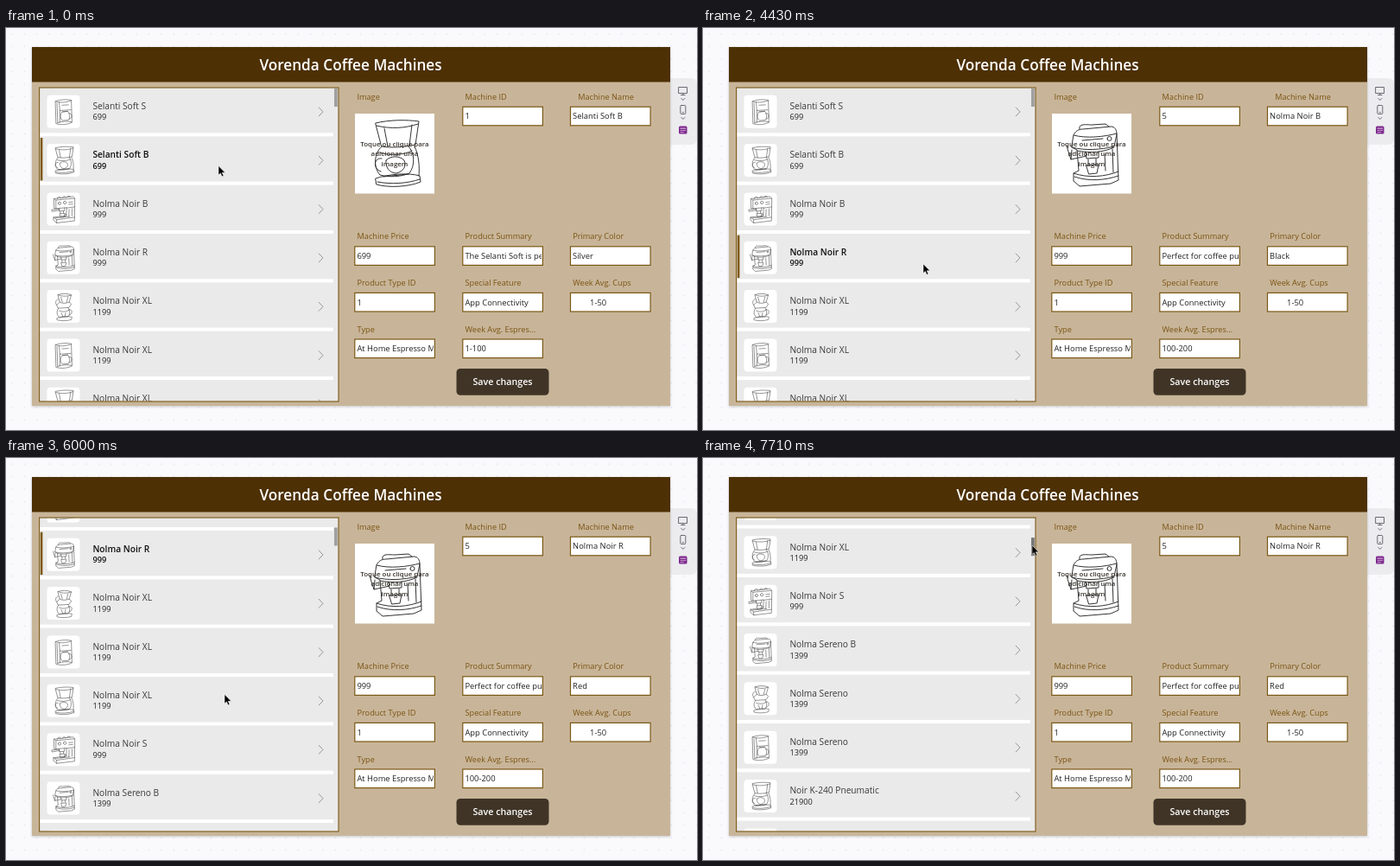
Animation of 800 by 465 pixels, one loop 8 s. Source, as an HTML page:

```html
<!DOCTYPE html>
<html lang="en">
<head>
<meta charset="utf-8">
<title>Coffee machine catalogue</title>
<style>
  html, body { margin: 0; width: 100%; height: 100%; overflow: hidden; background: #fafafd; }
  svg { display: block; }
  text { font-family: "Open Sans", "Noto Sans", sans-serif; white-space: pre; }
  .name { font-size: 10.2px; fill: #3a3a3a; }
  .price { font-size: 9.2px; fill: #222; }
  .sel text { font-weight: 600; fill: #111; }
  .bar { visibility: hidden; }
  .sel .bar { visibility: visible; }
  .label { font-size: 9.2px; fill: #7a5312; }
  .field { font-size: 9.4px; fill: #222; }
  .hint { font-size: 7.9px; font-weight: 600; fill: #3b3630; text-anchor: middle; }
  .line { fill: none; stroke-linecap: round; stroke-linejoin: round; }
</style>
</head>
<body>
<svg id="stage" width="800" height="465" viewBox="0 0 800 465">
  <defs>
    <pattern id="dots" width="14.4" height="14.4" patternUnits="userSpaceOnUse">
      <circle cx="7" cy="7" r=".8" fill="#e2e2e9"/>
    </pattern>
    <filter id="shadow" x="-5%" y="-5%" width="110%" height="112%">
      <feDropShadow dx="0" dy="1" stdDeviation="1.6" flood-color="#000" flood-opacity=".22"/>
    </filter>
    <clipPath id="listClip"><rect x="39" y="69.5" width="345.5" height="362"/></clipPath>

    <!-- Machine sketches, each on a 92 x 92 square -->
    <path id="m0" d="M24 17C36 12 54 11 68 14L70 76C58 83 38 84 26 80ZM24 17C34 22 54 21 68 15M34 20L36 43L67 41M36 43L36 76M28 22L30 78M42 47C36 54 37 67 43 71L60 70C65 63 64 52 59 46ZM61 51C71 48 73 65 62 67M44 47L58 45M30 77C42 73 58 72 69 75M42 28L60 27"/>
    <path id="m1" d="M24 11C40 7 60 7 74 9L70 36C56 39 42 40 31 38ZM25 14C42 18 58 17 73 12M66 13L63 37M34 17L38 38M31 38C22 46 21 62 29 71C40 74 54 73 63 69C70 60 69 45 62 38M29 45C38 49 58 48 66 43M31 52C22 50 20 64 30 67M36 54C42 48 52 49 57 54C60 61 56 67 48 69C40 69 35 62 36 54M69 38C74 48 75 62 74 72M24 75C38 70 62 68 75 72L76 79C62 85 38 86 25 82ZM26 79C42 82 60 81 75 76M33 73L62 70"/>
    <path id="m2" d="M20 17L72 11L78 16L77 79L27 85L18 77L18 69L54 65L55 42L21 45ZM20 17L25 21L77 16M25 21L25 44M29 17C29 10 39 10 39 16M44 15C44 9 52 9 52 14M56 13C57 8 65 8 65 12M31 30A4 4 0 1 0 39 30A4 4 0 1 0 31 30M46 28A4 4 0 1 0 54 28A4 4 0 1 0 46 28M61 27L72 26M61 33L72 32M55 43L77 40M34 45L34 52L49 51L49 43M35 49L14 53L13 48L34 46M37 53L38 58M46 52L46 57M36 59L50 58L48 68L39 69ZM50 60C56 59 55 66 49 66M18 69L27 76L77 69M27 76L27 85M23 71L64 67M62 47L61 66M70 45L70 65"/>
    <path id="m3" d="M25 25C27 20 31 18 36 18L68 15C73 15 75 19 75 24L77 77L68 81L32 84L25 78L25 69L31 66L29 42L23 39ZM25 25C40 29 60 27 75 23M32 18C30 11 40 13 46 13L62 12L66 15M23 39C38 43 56 42 72 38L75 24M29 43C45 46 59 45 72 39M70 41L71 68M39 44L40 52L54 51L54 44M40 49L22 53L19 44L17 37M22 53L23 42M42 53L42 58M51 52L51 57M40 60L54 59L52 69L43 70ZM25 69C42 75 62 73 77 67M26 73C43 79 62 77 77 72M61 47L62 66M35 31L59 29M64 29A2.5 2.5 0 1 0 69 29A2.5 2.5 0 1 0 64 29"/>
    <path id="m4" d="M31 13C43 9 57 9 68 14L62 34C52 38 42 38 36 34ZM31 13C42 19 58 18 68 14M36 34L27 42L31 51L62 49L68 39L62 34M39 20L43 34M59 19L55 34M32 51C25 60 28 72 35 77L59 75C66 66 64 56 59 50M34 58C44 62 54 61 62 56M61 55C73 52 72 69 62 70M28 79C40 73 57 72 70 76L68 83C56 87 38 87 29 84ZM27 42C22 36 24 28 31 26M40 64L44 74M52 64L50 74"/>
  </defs>

  <rect width="800" height="465" fill="#fafafd"/>
  <rect width="800" height="465" fill="url(#dots)"/>
  <path d="M769 58H793Q800 58 800 65V128Q800 135 793 135H769Z" fill="#ececef"/>
  <g class="line" stroke="#5c5c64" stroke-width=".9">
    <path d="M779 68.5H788.5V75.5H779ZM783.8 75.5V77.5M781.5 77.5H786"/>
    <path d="M781.8 81.5L783.8 83.5L785.8 81.5M781.8 103.5L783.8 105.5L785.8 103.5"/>
    <rect x="780.8" y="89.5" width="6" height="10" rx="1"/>
    <path d="M783 97.7H784.6"/>
  </g>
  <rect x="779" y="113.5" width="9.5" height="9" rx="1.5" fill="#7f2a8e"/>
  <path d="M780.5 116.2H787M781 118.5H782.5M783.2 118.5H784.6M785.3 118.5H786.7M781 120.6H782.5M783.2 120.6H784.6" stroke="#f3e4f5" stroke-width=".8"/>

  <rect x="30" y="22" width="739" height="415" fill="#c8b599" filter="url(#shadow)"/>
  <rect x="30" y="22" width="739" height="40.5" fill="#4d3004"/>
  <text x="399" y="48.8" font-size="17.2" font-weight="600" fill="#fff" text-anchor="middle">Vorenda Coffee Machines</text>

  <rect x="38.6" y="69" width="346.4" height="363" fill="#eaeaea"/>
  <g clip-path="url(#listClip)"><g id="list"></g></g>
  <rect id="thumb" x="380" y="70" width="3.8" height="21"/>
  <rect x="38.6" y="69" width="346.4" height="363" fill="none" stroke="#7a5714" stroke-width="1.1"/>

  <g id="form"></g>
  <rect x="404" y="99" width="92" height="92.5" fill="#fff"/>
  <use id="photo" class="line" x="404" y="99" stroke="#333" stroke-width="1"/>
  <text class="hint" x="450" y="137">Toque ou clique para</text>
  <text class="hint" x="450" y="148.3">adicionar uma</text>
  <text class="hint" x="450" y="159.6">imagem</text>

  <rect x="521.5" y="394" width="107" height="30.7" rx="4.5" fill="#3f3426"/>
  <text x="575" y="413.2" font-size="10.7" font-weight="600" fill="#fff" text-anchor="middle">Save changes</text>
  <path id="cursor" d="M0 0V10.6L2.4 8.4L4.1 12.2L5.9 11.4L4.2 7.8H7.7Z" fill="#000" stroke="#fff" stroke-width=".5"/>
</svg>
<script>
const $ = id => document.getElementById(id);
const LOOP = 8000, FPS = 7, PITCH = 56.35;

function add(parent, tag, attrs, text) {
  const node = document.createElementNS('http://www.w3.org/2000/svg', tag);
  for (const key in attrs) node.setAttribute(key, attrs[key]);
  if (text) node.textContent = text;
  parent.appendChild(node);
  return node;
}

// Product list
const items = [
  ['Selanti Soft S', 699], ['Selanti Soft B', 699],
  ['Nolma Noir B', 999], ['Nolma Noir R', 999],
  ['Nolma Noir XL', 1199], ['Nolma Noir XL', 1199], ['Nolma Noir XL', 1199],
  ['Nolma Noir S', 999], ['Nolma Sereno B', 1399],
  ['Nolma Sereno', 1399], ['Nolma Sereno', 1399],
  ['Noir K-240 Pneumatic', 21900], ['Noir K-240 Pneumatic', 21900]
];
const rows = items.map(([name, price], i) => {
  const row = add($('list'), 'g', { transform: `translate(0 ${69.3 + i * PITCH})` });
  add(row, 'rect', { x: 39, y: 52, width: 340, height: 4, fill: '#fff' });
  add(row, 'rect', { class: 'bar', x: 39.8, y: 1.4, width: 2.6, height: 49.4, fill: '#7f5a14' });
  add(row, 'rect', { x: 47.5, y: 8.4, width: 38, height: 38, rx: 4, fill: '#fff' });
  add(row, 'use', {
    href: '#m' + i % 5, class: 'line', stroke: '#4a4a4a', 'stroke-width': 1.4,
    transform: 'translate(47.5 8.4) scale(.413)'
  });
  add(row, 'text', { class: 'name', x: 100.4, y: 24.7 }, name);
  add(row, 'text', { class: 'price', x: 100.4, y: 37 }, String(price));
  add(row, 'path', { class: 'line', d: 'M362.2 22.6L367 27.6L362.2 32.6', stroke: '#8c8c8c', 'stroke-width': .9 });
  return row;
});

// Form: key, label, column, row, label shift, value indent
const colX = [403.8, 528.8, 653.5], rowY = [102, 263.6, 317.2, 370.8];
const layout = [
  ['id', 'Machine ID', 1, 0, 0, 0], ['name', 'Machine Name', 2, 0, 6, 0],
  ['price', 'Machine Price', 0, 1, 0, 0], ['summary', 'Product Summary', 1, 1, 0, 0],
  ['color', 'Primary Color', 2, 1, 0, 0], ['type', 'Product Type ID', 0, 2, 0, 0],
  ['feature', 'Special Feature', 1, 2, 0, 0], ['cups', 'Week Avg. Cups', 2, 2, 0, 20],
  ['kind', 'Type', 0, 3, 0, 0], ['shots', 'Week Avg. Espres...', 1, 3, 0, 0]
];
const fields = {};
add($('form'), 'text', { class: 'label', x: 406.4, y: 82.5 }, 'Image');
for (const [key, label, c, r, shift, indent] of layout) {
  const x = colX[c], y = rowY[r];
  add($('form'), 'text', { class: 'label', x: x + 2.7 + shift, y: y - 19.3 }, label);
  add($('form'), 'rect', { x, y: y - 10.8, width: 92.6, height: 21.6, fill: '#fff', stroke: '#7a5714', 'stroke-width': 1.2 });
  const box = add($('form'), 'svg', { x: x + 1, y: y - 10, width: 90.2, height: 20, overflow: 'hidden' });
  fields[key] = add(box, 'text', { class: 'field', x: 1.6 + indent, y: 13.4 });
}

const shared = { type: '1', feature: 'App Connectivity', cups: '1-50', kind: 'At Home Espresso Machine' };
const perfect = 'Perfect for coffee purists';
const records = {
  1: { ...shared, id: '1', price: '699', summary: 'The Selanti Soft is perfect', shots: '1-100', color: 'Black' },
  2: { ...shared, id: '4', price: '999', summary: perfect, shots: '1-100', color: 'Black' },
  3: { ...shared, id: '5', price: '999', summary: perfect, shots: '100-200', color: 'Red' }
};

// Keyed tracks in steps of 1/7 s
const cursorTrack = [
  [0, 246, 159.5], [9, 246, 159.5], [12, 255, 216], [19, 255, 216], [26, 255, 273],
  [34, 255, 273], [35, 253, 273.5], [45, 253, 273.5], [53, 381, 100], [54, 381, 101]
];
const scrollTrack = [
  [37, 0], [38, 4], [39, 17], [40, 38.6], [41, 95], [42, 154], [43, 235], [44, 312], [45, 325.5]
];
function sample(track, k, ease = u => u) {
  const i = track.findIndex(p => p[0] > k);
  if (i === 0) return track[0].slice(1);
  if (i < 0) return track[track.length - 1].slice(1);
  const a = track[i - 1], b = track[i], u = ease((k - a[0]) / (b[0] - a[0]));
  return a.slice(1).map((v, n) => v + (b[n + 1] - v) * u);
}
const smooth = u => u * u * (3 - 2 * u);
const pick = (k, second, third) => k < second ? 1 : k < third ? 2 : 3;

function draw(k) {
  const selected = pick(k, 16, 29), loaded = pick(k, 17, 31), late = pick(k, 18, 32);
  rows.forEach((row, i) => row.setAttribute('class', i === selected ? 'sel' : ''));

  // Name and colour refresh a little after the other fields
  const values = {
    ...records[loaded],
    name: items[late][0],
    color: k < 2 ? 'Silver' : records[late].color
  };
  for (const key in fields) fields[key].textContent = values[key];
  $('photo').setAttribute('href', '#m' + loaded);

  const [scroll] = sample(scrollTrack, k);
  $('list').setAttribute('transform', `translate(0 ${-scroll})`);
  $('thumb').setAttribute('y', 70 + scroll * .068);
  $('thumb').setAttribute('fill', k < 53 ? '#a0a0a0' : '#777');
  $('cursor').setAttribute('transform', `translate(${sample(cursorTrack, k, smooth)})`);
}

let last = -1;
function tick() {
  const t = performance.now() % LOOP;
  const k = Math.floor((t + 5) * FPS / 1000) % (LOOP * FPS / 1000);
  if (k !== last) draw(last = k);
  requestAnimationFrame(tick);
}
tick();
</script>
</body>
</html>
```
